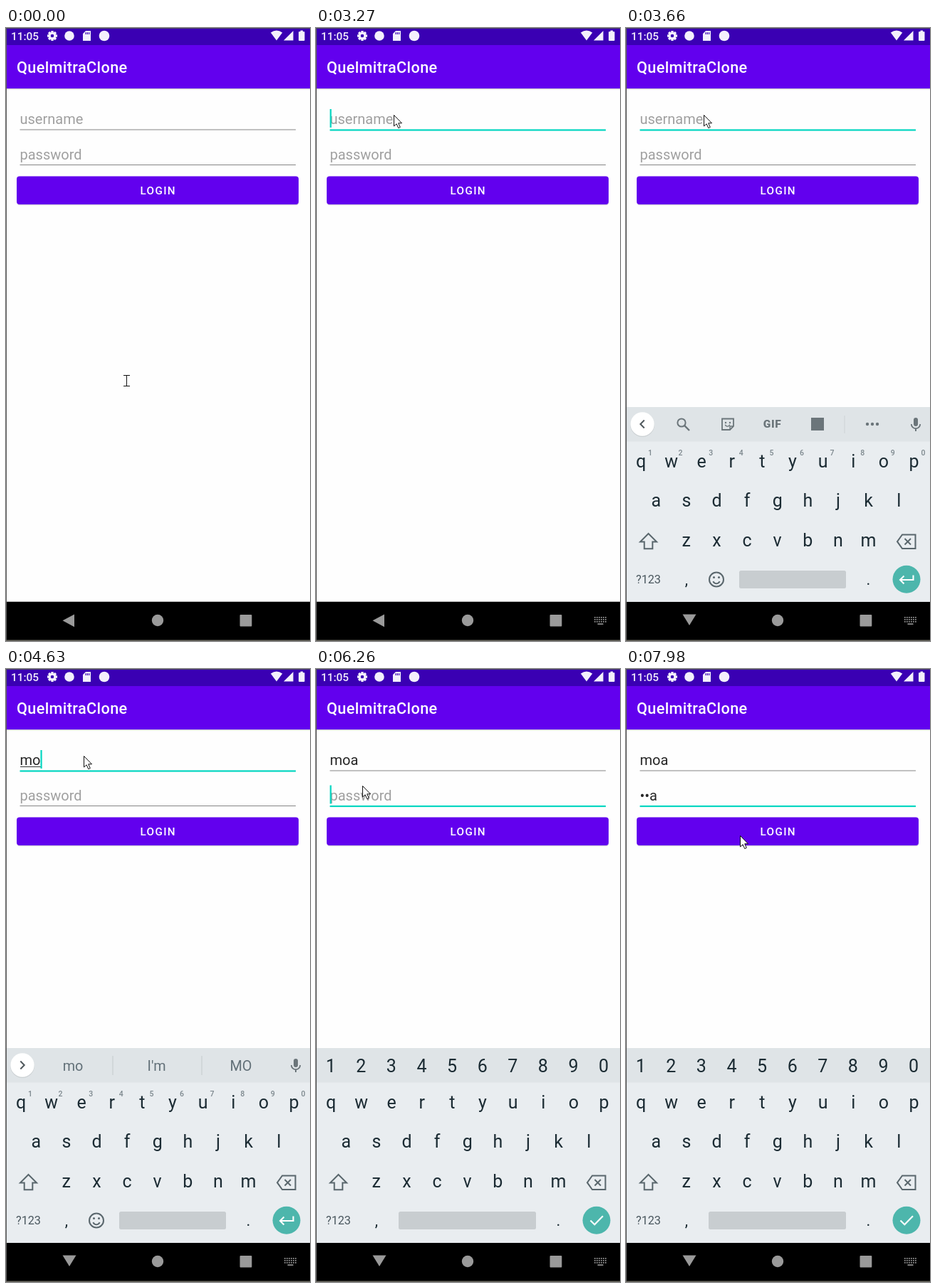
An HTML page with a canvas for the animation above (8 s loop, 427 by 862 pixels).

```html
<!DOCTYPE html>
<html lang="en">
<head>
<meta charset="utf-8">
<title>Login screen</title>
<style>
  html, body { margin: 0; width: 100%; height: 100%; overflow: hidden; background: #fff; }
  canvas { display: block; width: 427px; height: 862px; }
</style>
</head>
<body>
<canvas id="stage"></canvas>
<script>
const W = 427, H = 862, LOOP = 8000;
const PURPLE = '#6200ee', TEAL = '#03d6c1', INK = '#1b2b33', ICON = '#6b757a', NAV = '#9a9a9a';
const canvas = document.getElementById('stage');
const ctx = canvas.getContext('2d');
const dpr = window.devicePixelRatio || 1;
canvas.width = W * dpr;
canvas.height = H * dpr;

// Pointer stops: [time, x, y]; it turns from I-beam to arrow at ARROW_AT.
const ARROW_AT = 2240;
const pointerStops = [
  [0, 169, 496], [150, 178, 500], [270, 192, 505], [390, 204, 503], [540, 201, 499], [660, 197, 495],
  [1980, 195, 485], [2100, 190, 425], [2240, 245, 330], [2360, 369, 215], [2480, 300, 150],
  [2610, 180, 118], [2730, 120, 116], [2870, 111, 120], [3000, 109, 122], [5410, 79, 110],
  [5560, 66, 122], [5690, 59, 154], [5840, 62, 157], [5990, 65, 164], [7710, 67, 168],
  [7830, 70, 177], [7980, 160, 234]
];
const userStops = [[0, ''], [4630, 'mo'], [4880, 'moa']];
const passStops = [[0, ''], [6910, 'm'], [7030, '•o'], [7150, '••a']];
const caretStops = [[0, false], [3150, true], [3660, false], [4060, true], [5410, false],
  [5840, true], [6760, false], [6910, true], [7710, false]];

function at(stops, t) {
  let hit = stops[0];
  for (const s of stops) if (s[0] <= t) hit = s;
  return hit;
}

function rect(x, y, w, h, color) {
  ctx.fillStyle = color;
  ctx.fillRect(x, y, w, h);
}

function round(x, y, w, h, r, color) {
  ctx.fillStyle = color;
  ctx.beginPath();
  ctx.roundRect(x, y, w, h, r);
  ctx.fill();
}

function disc(x, y, r, color) {
  ctx.fillStyle = color;
  ctx.beginPath();
  ctx.arc(x, y, r, 0, 7);
  ctx.fill();
}

function path(points, closed) {
  ctx.beginPath();
  points.forEach(([x, y], i) => i ? ctx.lineTo(x, y) : ctx.moveTo(x, y));
  if (closed) ctx.closePath();
}

function poly(points, color) {
  path(points, true);
  ctx.fillStyle = color;
  ctx.fill();
}

function line(points, color, width, closed) {
  path(points, closed);
  ctx.strokeStyle = color;
  ctx.lineWidth = width;
  ctx.stroke();
}

function ring(x, y, r, color, width, from = 0, to = Math.PI * 2) {
  ctx.beginPath();
  ctx.arc(x, y, r, from, to);
  ctx.strokeStyle = color;
  ctx.lineWidth = width;
  ctx.stroke();
}

function text(str, x, y, size, color, { weight = 400, align = 'left', spacing = 0 } = {}) {
  ctx.font = `${weight} ${size}px Roboto, sans-serif`;
  ctx.letterSpacing = spacing + 'px';
  ctx.textAlign = align;
  ctx.fillStyle = color;
  ctx.fillText(str, x, y);
  return ctx.measureText(str).width;
}

const label = (str, x, y, size, color, weight) => text(str, x, y, size, color, { weight, align: 'center' });

function statusBar() {
  rect(0, 0, W, 24, '#3a00b3');
  text('11:05', 7, 17, 15.4, '#f4f0fc', { weight: 500 });
  const white = '#f4f0fc';
  for (let i = 0; i < 8; i++) {
    ctx.save();
    ctx.translate(65, 11);
    ctx.rotate(i * Math.PI / 4);
    rect(-1.7, -7, 3.4, 4, white);
    ctx.restore();
  }
  ring(65, 11, 3.9, white, 3.2);
  disc(89, 11, 6.8, white);
  poly([[112, 4], [119, 4], [119, 18], [108, 18], [108, 8]], white);
  for (let i = 0; i < 3; i++) rect(111.5 + i * 2.3, 6, 1.2, 3, '#3a00b3');
  disc(138, 11, 7.3, white);
  ctx.fillStyle = white;
  ctx.beginPath();
  ctx.moveTo(380, 17.5);
  ctx.lineTo(371.8, 6.6);
  ctx.quadraticCurveTo(380, 0.6, 388.2, 6.6);
  ctx.fill();
  poly([[390, 17.5], [403.5, 17.5], [403.5, 4]], white);
  round(411, 5, 8.5, 13, 1, white);
  rect(413.5, 3.5, 3.5, 2, white);
}

function appBar() {
  rect(0, 24, W, 61, PURPLE);
  rect(0, 85, W, 1, '#cfcdd3');
  rect(0, 86, W, 1, '#f0f0f1');
  text('QuelmitraClone', 15, 63.3, 21.7, '#fff', { weight: 500, spacing: 0.35 });
}

function field(y, hint, value, focused, caret, composing) {
  const base = y - 8;
  const width = value ? text(value, 19.5, base, 20, '#262626') : 0;
  if (!value) text(hint, 19.5, base, 20, '#a0a0a0');
  if (composing) rect(20, base + 2, width, 1, '#333');
  if (focused) rect(19.5, y - 0.6, 387.5, 2.2, TEAL);
  else rect(19.5, y - 0.5, 387.5, 1, '#858585');
  if (caret) rect(19.5 + width, y - 29, 2.2, 26, TEAL);
}

function loginButton() {
  round(15.5, 210, 395.5, 39.2, 4, '#d0c8dc');
  round(15, 208.5, 396, 39.5, 4, PURPLE);
  text('LOGIN', 213.7, 234.4, 15.2, '#fff', { weight: 500, align: 'center', spacing: 1.36 });
}

function navBar(typing, switcher) {
  rect(0, 806.5, W, 1, '#8a8a8a');
  rect(0, 807, W, 55, '#000');
  if (typing) poly([[79.5, 824.5], [98.5, 824.5], [89, 840]], NAV);
  else poly([[79.5, 833.3], [96, 824.5], [96, 842.3]], NAV);
  disc(213, 833, 8.2, NAV);
  round(328.5, 825, 16.8, 16.6, 1, NAV);
  if (switcher) {
    for (let row = 0; row < 3; row++)
      for (let col = 0; col < 6; col++) rect(391 + col * 3, 828 + row * 3, 1.7, 1.7, NAV);
    rect(395.5, 837.3, 8, 1.6, NAV);
  }
}

function mic(x, y) {
  round(x - 3, y - 9, 6, 12, 3, ICON);
  ring(x, y, 6.2, ICON, 1.8, 0, Math.PI);
  rect(x - 1, y + 6, 2, 4, ICON);
}

function chevron(dir) {
  disc(23, 558, 17, '#cbd0d3');
  disc(23, 557, 16.7, '#fff');
  line([[23 - dir * 2.7, 551.5], [23 + dir * 2.7, 557], [23 - dir * 2.7, 562.5]], '#50585d', 2);
}

function toolStrip() {
  chevron(-1);
  ring(78, 555, 5.6, ICON, 2);
  line([[82.2, 559.2], [89, 566]], ICON, 2.4);
  ctx.beginPath();
  ctx.moveTo(151, 560);
  ctx.lineTo(151, 549.5);
  ctx.lineTo(135, 549.5);
  ctx.lineTo(135, 565);
  ctx.lineTo(146, 565);
  ctx.closePath();
  ctx.strokeStyle = ICON;
  ctx.lineWidth = 1.8;
  ctx.stroke();
  line([[146, 565], [146, 560], [151, 560]], ICON, 1.4);
  disc(140, 555, 1.2, ICON);
  disc(146, 555, 1.2, ICON);
  ring(142.5, 557, 3.2, ICON, 1.3, 0.2, 2.9);
  text('GIF', 205.5, 562.3, 15.5, ICON, { weight: 900, align: 'center', spacing: 0.6 });
  rect(260, 548, 18, 18, ICON);
  rect(306.5, 545, 1, 25, '#cdd2d5');
  for (let i = -1; i < 2; i++) disc(346 + i * 7, 557, 2.2, ICON);
  mic(407, 557);
}

function suggestions(words) {
  chevron(1);
  words.forEach((w, i) => label(w, [94, 211.5, 330][i], 565.3, 19.8, '#627078'));
  rect(149.5, 544, 1, 27, '#c3c9cc');
  rect(274.5, 544, 1, 27, '#c3c9cc');
  mic(407, 557);
}

function keyRow(keys, x, y) {
  [...keys].forEach((k, i) => label(k, x + i * 42.6, y, 25, INK));
}

function keyboard(password, value) {
  rect(0, 533, W, 274, '#e9edf0');
  rect(0, 533, W, 48.5, '#dfe4e7');
  if (password) keyRow('1234567890', 20.7, 567);
  else {
    if (value) suggestions(value.length > 2 ? ['moa', 'Moa', 'boa'] : ['mo', "I'm", 'MO']);
    else toolStrip();
    [...'1234567890'].forEach((n, i) => label(n, 34 + i * 42.6, 600.5, 10.5, '#7b868c', 500));
  }
  keyRow('qwertyuiop', 21, 618);
  keyRow('asdfghjkl', 42.4, 673);
  keyRow('zxcvbnm', 84.8, 728.5);

  line([[31.5, 711], [43, 722.5], [37.3, 722.5], [37.3, 732.3], [25.7, 732.3], [25.7, 722.5], [20, 722.5]],
    '#59666c', 2, true);
  line([[388, 712.5], [406.5, 712.5], [406.5, 732], [388, 732], [381, 722.2]], '#59666c', 2, true);
  line([[391.5, 718], [400, 726.5]], '#59666c', 2);
  line([[400, 718], [391.5, 726.5]], '#59666c', 2);

  label('?123', 31.5, 781, 16.2, '#4a575e');
  label(',', 85, 783, 22, INK);
  label('.', 340.5, 783, 22, INK);
  const left = password ? 116 : 159;
  round(left, 763, 309 - left, 25, 2.5, '#c8cdd0');
  if (!password) {
    ring(127, 775.5, 10, '#59666c', 2);
    disc(123.5, 772.5, 1.5, '#59666c');
    disc(130.5, 772.5, 1.5, '#59666c');
    ring(127, 776.2, 5, '#59666c', 2, 0.4, 2.75);
  }
  disc(394, 775.3, 19.5, '#4db6ac');
  if (password) line([[385.5, 775.5], [391.3, 781.3], [403, 769.3]], '#fff', 2.2);
  else {
    line([[403.5, 769.5], [403.5, 776], [386, 776]], '#fff', 2.1);
    line([[390.5, 770.5], [385, 776], [390.5, 781.5]], '#fff', 2.1);
  }
}

function pointer(t) {
  const [, x, y] = at(pointerStops, t);
  if (t < ARROW_AT) {
    rect(x, y - 8, 1, 16, '#111');
    rect(x - 4, y - 8, 9, 1, '#111');
    rect(x - 4, y + 7, 9, 1, '#111');
    return;
  }
  const shape = [[0, 0], [0, 15.5], [3.6, 12.3], [6.3, 18.2], [8.8, 17], [6.2, 11.3], [11, 11.3]]
    .map(([dx, dy]) => [x + dx + 0.5, y + dy + 0.5]);
  poly(shape, '#fff');
  line(shape, '#111', 1, true);
}

function draw(t) {
  ctx.setTransform(dpr, 0, 0, dpr, 0, 0);
  rect(0, 0, W, H, '#fefefe');
  const user = at(userStops, t)[1], pass = at(passStops, t)[1];
  const onPass = t >= 6260, caret = at(caretStops, t)[1];

  statusBar();
  appBar();
  field(143, 'username', user, t >= 2870 && !onPass, caret && !onPass, user && !onPass);
  field(192.5, 'password', pass, t >= 6120, caret && onPass);
  loginButton();

  const opening = t >= 3390 && t < 3510;
  navBar(t >= 3390, t >= 3000);
  if (t >= 3390) {
    ctx.save();
    ctx.beginPath();
    ctx.rect(0, 0, W, opening ? 816 : 807);
    ctx.clip();
    if (opening) {
      rect(0, 542, W, 274, '#fefefe');
      ctx.globalAlpha = 0.85;
      ctx.translate(0, 9);
    }
    keyboard(onPass, user);
    if (opening) rect(0, 798, W, 9, '#c2c7ca');
    ctx.restore();
  }

  rect(0, 0, 1, H, '#5c5c5c');
  rect(0, 0, W, 1, '#4c4660');
  rect(0, 860.5, W, 1.5, '#66645c');
  pointer(t);
}

const start = performance.now();
function tick() {
  draw((performance.now() - start) % LOOP);
  requestAnimationFrame(tick);
}
tick();
</script>
</body>
</html>
```
